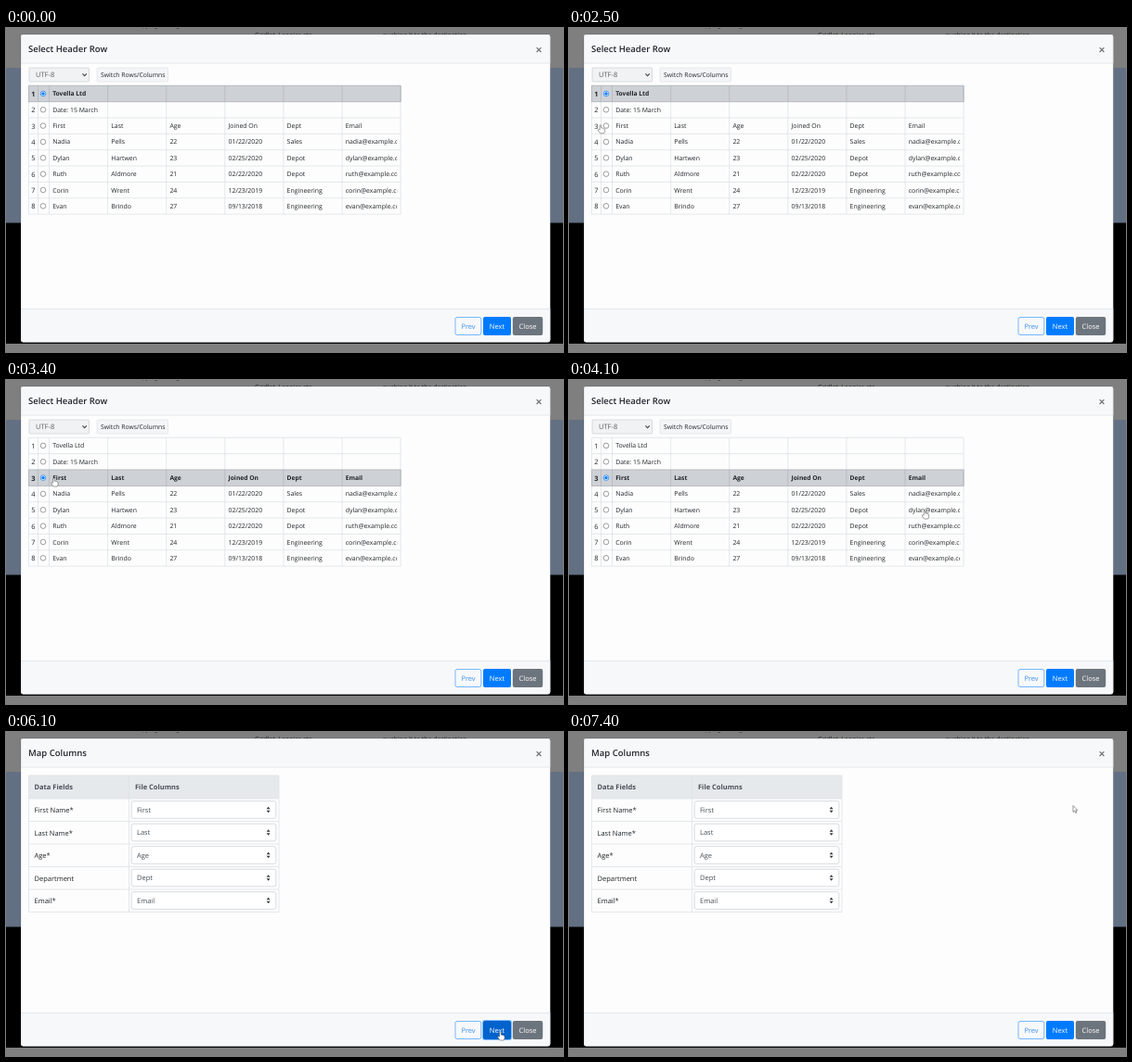
Animation, 600 px wide and 350 px high, one loop 7500 ms. Source, as an HTML page:

```html
<!DOCTYPE html>
<html lang="en">
<head>
<meta charset="utf-8">
<title>Import wizard</title>
<style>
  html, body { margin: 0; width: 100%; height: 100%; overflow: hidden; background: #000; }
  svg { display: block; width: 600px; height: 350px; }
  text { font: 7.5px "Open Sans", "Noto Sans", sans-serif; fill: #212529; text-rendering: geometricPrecision; }
  .cell { font-size: 6.9px; }
  .number { font-size: 7.4px; }
  .row rect { fill: none; }
  .row.on rect { fill: #ced2d6; stroke: #b4b8bc; stroke-width: .9; }
  .row.on .cell { font-weight: 700; font-size: 6.7px; }
  .row.on .number { font-weight: 700; }
  .row .ring { fill: #fff; stroke: #767676; stroke-width: .7; }
  .row .dot { fill: none; }
  .row.on .ring { stroke: #0075ff; }
  .row.on .dot { fill: #0075ff; }
  .title { font-size: 9.5px; font-weight: 600; }
  .bold { font-weight: 700; }
  .muted { fill: #495057; }
  .mid { text-anchor: middle; }
  .line { stroke: #dee2e6; stroke-width: .8; fill: none; }
  .behind { font-size: 6.9px; fill: #1c1e20; }
  #next { fill: #007bff; }
  #next.hover { fill: #0069d9; }
  #next.focus { fill: #0062cc; stroke: #80bdff; stroke-width: 2; paint-order: stroke; }
  .cursor { fill: #fff; stroke: #555; stroke-width: .6; stroke-linejoin: round; }
</style>
</head>
<body>
<svg viewBox="0 0 600 350">
  <defs><clipPath id="emails"><rect x="362" y="60" width="59.2" height="145"/></clipPath></defs>

  <rect width="600" height="350" fill="#7f7f7f"/>
  <rect y="43" width="600" height="168" fill="#637083"/>
  <rect y="210.5" width="600" height="130.5" fill="#000"/>
  <text class="behind" x="139" y="-.6">copying through</text>
  <text class="behind" x="268" y="10">Gridlet, Loopier etc</text>
  <text class="behind" x="406" y="10">pushing it to the destination</text>

  <rect x="16" y="7" width="570.3" height="332.5" rx="2.4" fill="#fdfdfd"/>
  <path d="M16 38V9.4Q16 7 18.4 7H583.9Q586.3 7 586.3 9.4V38Z" fill="#f7f8fa"/>
  <path d="M16 303.5H586.3V337.1Q586.3 339.5 583.9 339.5H18.4Q16 339.5 16 337.1Z" fill="#f7f8fa"/>
  <path class="line" d="M16 38H586.3M16 303.5H586.3"/>
  <rect x="16" y="7" width="570.3" height="332.5" rx="2.4" fill="none" stroke="#000" stroke-opacity=".2" stroke-width=".7"/>
  <path d="M571.6 21.2l4.8 4.8m0-4.8l-4.8 4.8" stroke="#6c6c6c" stroke-width="1.1"/>

  <g id="headerPage">
    <text class="title" x="24" y="26.3">Select Header Row</text>
    <rect x="25" y="43" width="64.5" height="15" rx="1" fill="#f1f2f3" stroke="#d0d3d6" stroke-width=".8"/>
    <text x="32" y="53.3" fill-opacity=".72">UTF-8</text>
    <path d="M82.4 49.4l2.2 2.2 2.2-2.2" fill="none" stroke="#444" stroke-width="1.1"/>
    <rect x="98" y="43" width="76.5" height="15" rx="1" fill="#f4f5f7" stroke="#e2e5e8" stroke-width=".8"/>
    <text x="102" y="53.1" style="font-size:6.8px">Switch Rows/Columns</text>
    <g id="rows"></g>
  </g>

  <g id="mapPage">
    <text class="title" x="24" y="26.3">Map Columns</text>
    <rect x="24.5" y="47" width="269.5" height="25" fill="#e6e9ec"/>
    <text class="bold muted" x="30.5" y="62.2">Data Fields</text>
    <text class="bold muted" x="139" y="62.2">File Columns</text>
    <g id="fields"></g>
  </g>

  <rect x="484" y="312.5" width="27.8" height="19" rx="2" fill="none" stroke="#007bff" stroke-width=".8" stroke-opacity=".65"/>
  <rect id="next" x="514" y="312" width="30" height="20" rx="2"/>
  <rect x="545.8" y="312" width="32.4" height="20" rx="2" fill="#6c757d"/>
  <text class="mid" x="498" y="325" style="fill:#3c8ff0">Prev</text>
  <text class="mid" x="529" y="325" style="fill:#fff">Next</text>
  <text class="mid" x="562" y="325" style="fill:#fff">Close</text>

  <g id="pointer">
    <path id="hand" class="cursor" transform="scale(.92)" d="M-.9 5.6V.9Q-.9 0 0 0T.9 .9V3.5Q2 3 2.5 3.9Q3.4 3.5 3.9 4.4Q5 4.2 5 5.4V7.5Q4.8 8.6 4 9.8H-.4L-2.9 6.5Q-3.2 5.3-2.1 5.2Z"/>
    <path id="arrow" class="cursor" d="M0 0V7L1.6 5.6 2.7 8 3.8 7.5 2.8 5.2H4.9Z"/>
  </g>
</svg>

<script>
const $ = id => document.getElementById(id);
const text = (x, y, value, cls = "") => `<text class="${cls}" x="${x}" y="${y}">${value}</text>`;

const LOOP = 7500, STEP = 100;
const SELECT_AT = 3400, FOCUS_AT = 5400, MAP_AT = 5700, LEAVE_AT = 6700;

// Header row picker
const people = [
  ["Nadia", "Pells", 22, "01/22/2020", "Sales"],
  ["Dylan", "Hartwen", 23, "02/25/2020", "Depot"],
  ["Ruth", "Aldmore", 21, "02/22/2020", "Depot"],
  ["Corin", "Wrent", 24, "12/23/2019", "Engineering"],
  ["Evan", "Brindo", 27, "09/13/2018", "Engineering"]
];
const table = [
  ["Tovella Ltd"],
  ["Date: 15 March"],
  ["First", "Last", "Age", "Joined On", "Dept", "Email"],
  ...people.map(p => [...p, p[0].toLowerCase() + "@example.com"])
];
const TOP = 62.3, ROW = 17.35, LEFT = 46.5, COL = 63.1;

const rowMarkup = (cells, r) => {
  const y = TOP + r * ROW, base = y + 11.1;
  const labels = cells.map((value, c) => {
    const label = text(LEFT + 3.7 + c * COL, base, value, "cell");
    return c === 5 ? `<g clip-path="url(#emails)">${label}</g>` : label;
  }).join("");
  return `<g class="row"><rect x="24.5" y="${y}" width="400.5" height="${ROW}"/>
    ${text(29.3, base + .5, r + 1, "number mid")}
    <circle class="ring" cx="40" cy="${y + 8.6}" r="2.8"/>
    <circle class="dot" cx="40" cy="${y + 8.6}" r="1.7"/>${labels}</g>`;
};
const bottom = TOP + table.length * ROW;
const columnLines = [24.5, 34.5];
for (let c = 0; c <= 6; c++) columnLines.push(LEFT + c * COL);
let grid = columnLines.map(x => `M${x} ${TOP}V${bottom}`).join("");
for (let r = 0; r <= table.length; r++) grid += `M24.5 ${TOP + r * ROW}H425`;
$("rows").innerHTML = `<path class="line" d="${grid}"/>` + table.map(rowMarkup).join("") +
  `<path id="pickedLines" stroke="#b4b8bc" stroke-width=".8" d="${columnLines.map(x => `M${x} ${TOP}v${ROW}`).join("")}"/>`;

// Column mapping
const fields = [["First Name*", "First"], ["Last Name*", "Last"], ["Age*", "Age"],
  ["Department", "Dept"], ["Email*", "Email"]];
$("fields").innerHTML = fields.map(([name, column], i) => {
  const y = 72 + i * 24.5;
  return text(30.5, y + 15.3, name) +
    `<rect x="135.2" y="${y + 2.7}" width="155.6" height="18.6" rx="2" fill="#fff" stroke="#ced4da" stroke-width=".8"/>` +
    text(141, y + 14.7, column, "muted") +
    `<path d="M280.6 ${y + 11.3}l2-2.6 2 2.6zm0 1.4l2 2.6 2-2.6z" fill="#343a40"/>` +
    `<path class="line" d="M24.5 ${y}H294"/>`;
}).join("") + `<path class="line" d="M24.5 47H294V194.5H24.5ZM132.5 47V194.5"/>`;

// Pointer path: time, x, y
const path = [
  [1000, 533, 322], [1600, 74.5, 109.3], [1700, 55, 105.5], [1900, 26.5, 102.5],
  [2000, 26.5, 102.5], [2200, 30, 105], [2400, 30, 105], [2600, 38, 104.5],
  [2700, 38, 104.5], [3000, 51.5, 106], [3500, 51.5, 106], [4100, 383, 141],
  [4800, 525, 314], [5000, 532.5, 324], [6500, 532.5, 324], [7300, 543, 79.5], [7500, 543, 79.5]
];

// Smooth motion through the points without overshoot
const slope = (i, axis) => i < 0 || i > path.length - 2 ? 0
  : (path[i + 1][axis] - path[i][axis]) / (path[i + 1][0] - path[i][0]);
function speed(i, axis) {
  const a = slope(i - 1, axis), b = slope(i, axis);
  return a * b > 0 ? 2 * a * b / (a + b) : 0;
}
function pointerAt(t) {
  const i = path.findIndex(p => p[0] > t) - 1;
  const span = path[i + 1][0] - path[i][0], k = (t - path[i][0]) / span, rest = 1 - k;
  return [1, 2].map(axis =>
    path[i][axis] * rest * rest * (1 + 2 * k) + path[i + 1][axis] * k * k * (3 - 2 * k) +
    span * k * rest * (speed(i, axis) * rest - speed(i + 1, axis) * k));
}

const show = (id, on) => $(id).setAttribute("display", on ? "inline" : "none");
const rows = document.querySelectorAll(".row");

function draw(now) {
  const t = Math.floor(now % LOOP / STEP) * STEP;
  const mapping = t >= MAP_AT, visible = t >= path[0][0];
  const picked = t < SELECT_AT ? 0 : 2;
  rows.forEach((row, i) => row.classList.toggle("on", i === picked));
  $("pickedLines").setAttribute("transform", `translate(0 ${picked * ROW})`);
  show("headerPage", !mapping);
  show("mapPage", mapping);
  show("pointer", visible);

  let overNext = false;
  if (visible) {
    const [x, y] = pointerAt(t);
    overNext = x > 514 && x < 544 && y > 312 && y < 332;
    const overTable = !mapping && x < 425 && y > TOP && y < bottom;
    $("pointer").setAttribute("transform", `translate(${x} ${y})`);
    show("hand", overNext || overTable);
    show("arrow", !overNext && !overTable);
  }
  $("next").classList.toggle("hover", overNext);
  $("next").classList.toggle("focus", t >= FOCUS_AT && t < LEAVE_AT);
}

const start = performance.now();
function tick() {
  draw(performance.now() - start);
  requestAnimationFrame(tick);
}
tick();
</script>
</body>
</html>
```
